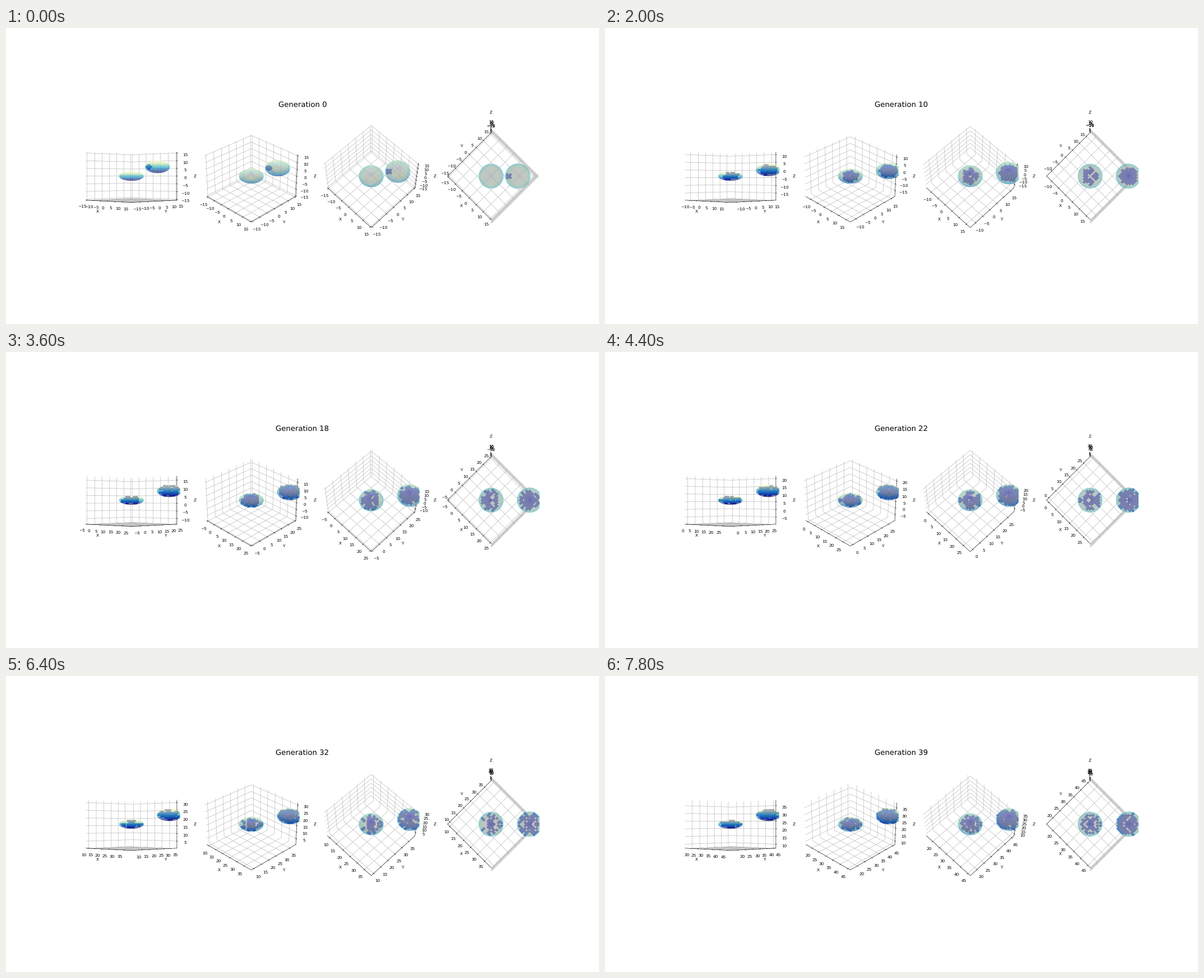
Write a matplotlib script that moves like this. It is 1058x529 px and loops after 8 s.

```python
import numpy as np
import matplotlib.pyplot as plt
from matplotlib.animation import FuncAnimation
from mpl_toolkits.mplot3d.art3d import Poly3DCollection

plt.rcParams["text.hinting"] = "none"
plt.rcParams["path.snap"] = False

FRAMES, INTERVAL = 40, 200
RADIUS = 6
HEIGHTS = (3, 4)            # vertical radius of each body
HALF = 15 * 25 / 24         # view half width with a small margin
BLUE = (0, 0, 1)


def walk(start, signs):
    """Unit steps; the walk keeps rising after the listed signs."""
    steps = [1 if s == "+" else -1 for s in signs.ljust(FRAMES - 1, "+")]
    return np.cumsum([start] + steps)


A_XY = walk(0, "++++++----+++")
A_Z = walk(0, "+++--------++")
B_XY = walk(9, "++--+++++++++")
B_Z = walk(6, "+--------++++")


def quad(axis, side):
    """Corners of one face of a unit cube."""
    corners = np.empty((4, 3))
    first, second = [k for k in range(3) if k != axis]
    corners[:, axis] = side / 2
    corners[:, first] = np.array([-1, 1, 1, -1]) / 2
    corners[:, second] = np.array([-1, -1, 1, 1]) / 2
    return corners


# faces that look at the camera: axis, side, brightness
FACES = [(quad(axis, side), tuple(side * np.eye(3, dtype=int)[axis]),
          np.array(BLUE) * light)
         for axis, side, light in ((0, 1, 0.417), (1, -1, 0.883), (2, 1, 0.767))]


def cells(gen, body):
    """Living cells of one body, mirrored across the x = y plane."""
    if gen == 0:
        if body == 0:
            return np.empty((0, 3), int)
        arms = np.vstack([np.zeros((1, 3)), np.eye(3), -np.eye(3)])
        return arms.astype(int) + (-3, -3, 0)

    span = np.arange(-6, 7)
    x, y, z = np.meshgrid(span, span, span, indexing="ij")
    noise = np.random.default_rng([7, body, gen]).random(x.shape)
    noise = np.where(x <= y, noise, noise.transpose(1, 0, 2))

    # whole cubes stay inside the shell
    reach = 0.72 if gen < 15 else 1
    far_x, far_y, far_z = (abs(k) + 0.5 for k in (x, y, z))
    alive = ((far_x**2 + far_y**2) / RADIUS**2 / reach
             + (far_z / HEIGHTS[body])**2 < 1.03)
    wave = np.cos(np.pi / 2 * np.minimum(x, y) + gen * 20 * np.pi / 39)
    chance = 0.3 + 0.2 * wave
    if gen <= 12:
        if body == 1:
            spread = np.sqrt((x + 3)**2 + (y + 3)**2 + z**2)
            alive &= spread < 1.5 + 0.75 * gen
        else:
            alive &= (gen >= 5) & (abs(x + y - 2) <= 1 + 1.3 * max(0, gen - 6))
        chance = chance * min(1, 0.45 + 0.05 * gen)
    elif body == 0 and 16 <= gen <= 20:
        alive &= x + y <= 4
    return np.argwhere(alive & (noise < chance)) - 6


def cell_faces(points):
    taken = set(map(tuple, points.tolist()))
    quads, colors = [], []
    for p in sorted(taken):
        for corners, step, color in FACES:
            if tuple(int(a + b) for a, b in zip(p, step)) not in taken:
                quads.append(corners + p)
                colors.append(color)
    return quads, colors


def add_body(ax, center, height):
    u = np.linspace(0, 2 * np.pi, 30)
    v = np.linspace(0, np.pi, 22)
    return ax.plot_surface(
        center[0] + RADIUS * np.outer(np.cos(u), np.sin(v)),
        center[1] + RADIUS * np.outer(np.sin(u), np.sin(v)),
        center[2] + height * np.outer(np.ones_like(u), np.cos(v)),
        cmap="YlGnBu_r", alpha=0.5, zorder=3)


def set_ticks(axis, center):
    spots = [t for t in range(-15, 16) if (t + center) % 5 == 0]
    names = [str(t + center).replace("-", "\u2212") for t in spots]
    axis.set_ticks(spots, labels=names)


fig, axes = plt.subplots(1, 4, figsize=(20, 10), dpi=52.9,
                         subplot_kw={"projection": "3d"})
title = fig.suptitle("", y=0.75, fontsize=18)
for ax, elev in zip(axes, (0, 30, 60, 90)):
    ax.computed_zorder = False      # shells always cover the cells
    ax.view_init(elev=elev, azim=-45)
    ax.set_xlim(-HALF, HALF)
    ax.set_ylim(-HALF, HALF)
    ax.set_zlim(-HALF, HALF)
    ax.set_xlabel("X")
    ax.set_ylabel("Y")
    ax.set_zlabel("Z")
    for axis in (ax.xaxis, ax.yaxis, ax.zaxis):
        axis.set_pane_color((1, 1, 1, 0))
    add_body(ax, (0, 0, 0), HEIGHTS[0])

partner = {"offset": None, "artists": []}
living = []


def draw(gen):
    # the view follows the first body, so all is drawn relative to it
    xy, z = int(A_XY[gen]), int(A_Z[gen])
    gap = int(B_XY[gen]) - xy
    offset = (gap, gap, int(B_Z[gen]) - z)
    title.set_text(f"Generation {gen}")

    if offset != partner["offset"]:
        for artist in partner["artists"]:
            artist.remove()
        partner["artists"] = [add_body(ax, offset, HEIGHTS[1]) for ax in axes]
        partner["offset"] = offset

    while living:
        living.pop().remove()
    groups = [cell_faces(cells(gen, 0)),
              cell_faces(cells(gen, 1) + np.array(offset))]
    for ax in axes:
        for axis, center in ((ax.xaxis, xy), (ax.yaxis, xy), (ax.zaxis, z)):
            set_ticks(axis, center)
        for quads, colors in groups:
            if quads:
                faces = Poly3DCollection(quads, facecolors=colors, zorder=2,
                                         edgecolors=colors, linewidths=0.6)
                ax.add_collection3d(faces)
                living.append(faces)
    return []


anim = FuncAnimation(fig, draw, frames=FRAMES, interval=INTERVAL,
                     repeat=True, repeat_delay=0, blit=False)
plt.show()
```
